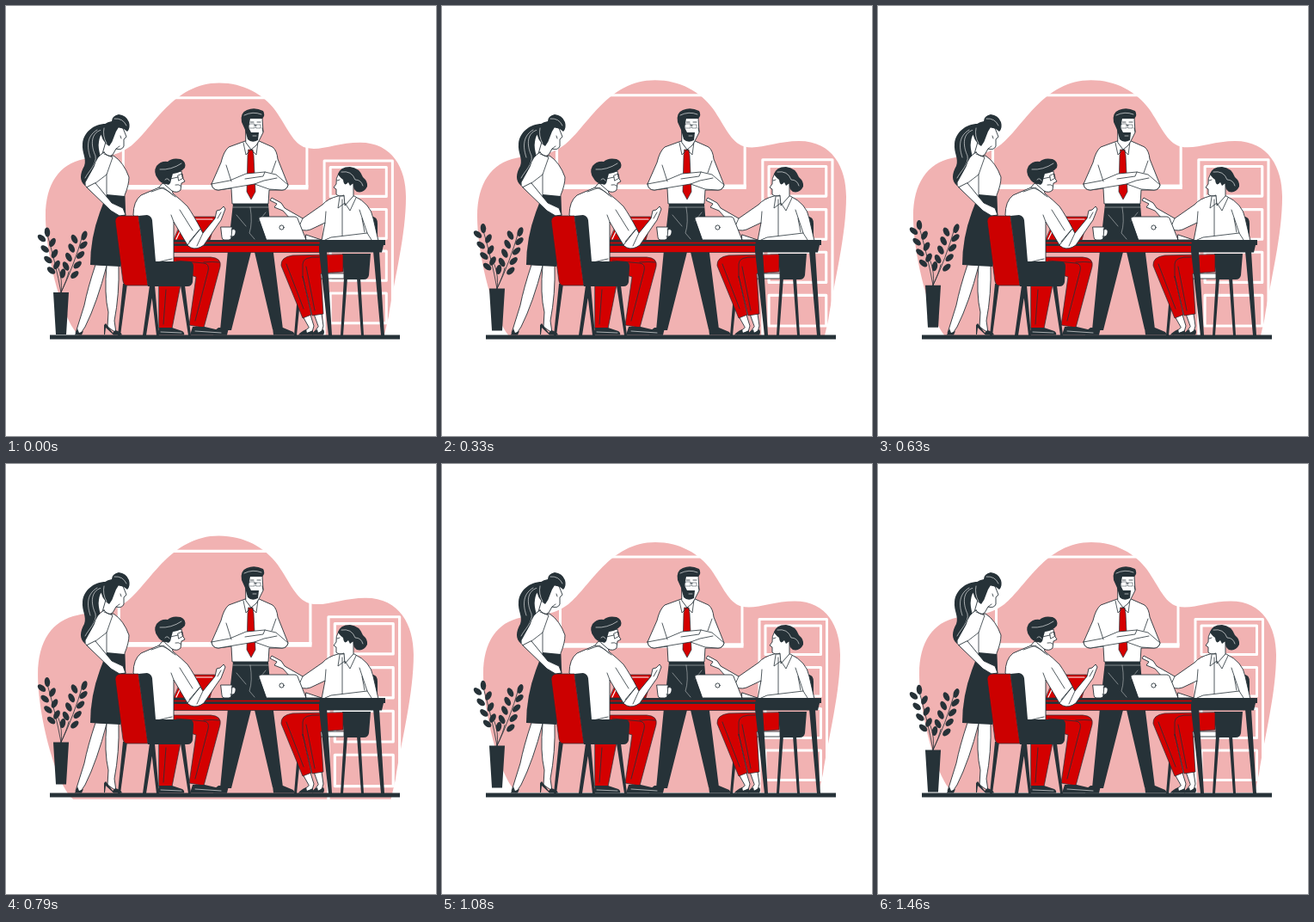
These frames come from a looping animation (500 by 500 pixels, 1500 ms). An HTML page:

```html
<!DOCTYPE html>
<html lang="en">
<head>
<meta charset="utf-8">
<title>Team meeting</title>
<style>
  html, body { margin: 0; height: 100%; overflow: hidden; background: #fff; }
  svg { display: block; width: 100vw; height: 100vh; }
  .pink { fill: #f1b2b2; }
  .dark { fill: #263238; }
  .red { fill: #d40000; stroke: #263238; stroke-width: .7; }
  .white { fill: #fff; stroke: #263238; stroke-width: .9; }
  .line { fill: none; stroke: #263238; stroke-width: .8; }
  .light { fill: none; stroke: #fff; stroke-width: .6; }
  .frame { fill: none; stroke: #fff; stroke-width: 3; }
  g { stroke-linejoin: round; stroke-linecap: round; }
</style>
</head>
<body>
<svg viewBox="0 0 500 500">
  <g id="backdrop">
    <path class="pink" d="M248 91C276 91 299 104 313 123C327 143 333 161 348 165.500C364 170 384 159.500 410 159.500C448 159.500 463 190 463 222C463 266 450 315 443 360L438 382H87C68 366 48 290 48 244C48 207 64 184 92 178.500C114 174 127 178 147 163C172 143 195 91 248 91Z"/>
    <path class="frame" d="M137.500 213V108H349V211"/>
    <path class="frame" stroke-linecap="butt" style="stroke-width:5.500" d="M136 211H350.500"/>
    <path class="frame" d="M369 382V180.500H447.500V382M376 188H440.500V221.500H376ZM376 236.500H440.500V270H376ZM376 284.500H440.500V318.500H376ZM376 333H440.500V367.500H376Z"/>
  </g>

  <g id="plant" class="dark">
    <path d="M55 333H73L70 382H58Z"/>
    <path class="line" d="M64 333Q58 300 47 262M64 333Q79 302 89 267M64 333Q66 318 61 305M64 333Q71 318 73 309"/>
  </g>

  <path class="dark" d="M51 382.500H458V387.500H51Z"/>

  <g id="standing-woman">
    <path class="dark" d="M116 137C102 137 90 147 89 160C88 171 94 177 91 186C86 195 85 203 92 209C93 201 104 198 109 187C113 177 106 168 108 158Q109 149 114 147Z"/>
    <path class="light" d="M111 144C96 148 100 166 104 174C106 184 96 192 92 200M106 144C92 152 95 167 98 176"/>
    <path class="white" d="M104 301Q95 328 91 348L81 380L86 382L92 373Q106 345 117 302Z"/>
    <path class="white" d="M117 302Q114 335 119 356L118 373L128 380L126 366Q132 335 131 302Z"/>
    <path class="dark" d="M83 375L80 382.500H88L90 378L85 380ZM116 369L114 371V382H115L116 374L125 382.500H135Q134 379 127 377L124 380Z"/>
    <path class="white" d="M122 139L136 142L140 152L137 155L137 163Q135 168 128 166L124 173Q116 178 112 172L116 158Z"/>
    <path class="dark" d="M110 143Q113 136 123 134Q123 128 131 126Q140 127 143 135Q145 142 141 146Q137 142 131 141Q128 145 126 151Q124 158 120 163Q110 157 110 143Z"/>
    <path class="white" d="M114 170Q105 175 102 187L92 205Q91 209 95 212L121 235Q128 245 138 244L138 220Q143 208 143 199Q137 182 125 174Q118 176 114 170Z"/>
    <path class="dark" d="M117 219L138 221L141 270L133 303L98 301Q98 270 109 240Z"/>
    <path class="white" d="M104 206L123 229L136 235L139 243L132 244L122 238L94 211Z"/>
    <path class="line" d="M114 172L124 176L117 196L104 206M117 196L117 219M133 151L134 154M128 166L132 163"/>
    <path class="light" d="M114 142Q112 151 117 160M126 131Q136 130 140 139"/>
  </g>

  <g id="standing-man">
    <path class="dark" d="M264 230H305L307 255L322 376H310L289 286H285L262 377H249L258 284Z"/>
    <path class="dark" d="M247 374H259L257 382.500H241Q241 378 247 374ZM310 374H322L334 379L336 382.500H311Z"/>
    <path class="light" style="opacity:.7" d="M264 234H305M284 234Q287 252 283 264L289 271M268 243L279 256M302 240L294 250"/>
    <path class="white" d="M281 156L259 164Q253 169 250 182L239 207Q240 214 247 214L262 212L263 230H305L306 214L321 214Q327 214 328 208L316 178Q315 168 310 164L292 156Z"/>
    <path class="red" d="M282 167H287L288 174L290 216L285 225L280 216L281 174Z"/>
    <path class="white" d="M239 207L260 203L279 195L301 193L314 196L328 208Q326 214 321 214L306 213L289 207L247 214Q240 214 239 207Z" style="stroke-width:.8"/>
    <path class="line" d="M289 207L300 203L315 200M301 193L299 198L278 201M256 185L262 204M314 180L309 194M276 159L279 173L285 167L291 173L293 158"/>
    <path class="white" d="M279 130H298L299 147L294 157L291 162L285 167L279 159Z"/>
    <path class="dark" d="M274 135Q272 124 280 121Q289 117 299 122Q302 127 298 131L284 131L282 141L285 147L294 147L293 156Q286 160 281 155L278 144Z"/>
    <path class="white" style="stroke-width:.5" d="M283 137H289V142H283ZM291 138H296V142H291Z"/>
    <path class="line" d="M278 138L283 137.500M289 138.500H291M284 135H288M292 135H296M298 142L299 146"/>
    <path class="light" d="M277 127Q287 122 297 126M287 151H291"/>
  </g>

  <g id="seated-woman">
    <path class="dark" d="M419 246L427 245Q432 246 432 253V275H418Z"/>
    <path class="dark" d="M391 288H424L422 313Q421 318 416 318H393ZM393 316H397L392 383H389ZM408 316H412L416 383H413ZM341 312H345L338 383H335Z"/>
    <path class="white" d="M341 311H393V317H341Z"/>
    <path class="white" d="M345 360L354 359L358 372L356 379L343 382L352 374ZM358 357L367 358L369 372L367 379L356 382L363 373Z"/>
    <path class="red" d="M392 289V309L366 311L369 358L356 360L345 314L355 359L345 363L320 302Q319 292 333 290Z"/>
    <path class="line" d="M364 292Q345 291 345 300V316M326 300L346 352M349 303L359 354"/>
    <path class="dark" d="M340 382.500Q342 379 349 376L350 380L357 377V382.500ZM354 382.500Q357 379 362 376L363 380L369 376Q371 379 369 382.500Z"/>
    <path class="white" d="M386 221Q374 224 368 231L345 247L324 235L320 229L309 223L307 226L315 230L312 234L322 238L339 257Q345 263 354 260L371 252L367 273H433L427 247Q424 230 405 221Z"/>
    <path class="line" d="M372 239L371 252M420 264L378 269L371 272M411 237L420 264L425 272M391 225V267M345 247L340 258M414 247L417 263"/>
    <path class="white" d="M387 194Q383 201 384 207L381 211L384 213L384 219Q387 222 393 220L394 232L404 221L404 207Z"/>
    <path class="line" d="M388 222L386 235L394 229L400 238L407 223M385 203L388 202"/>
    <path class="dark" d="M386 196Q388 187 400 187Q411 188 415 199Q421 204 420 210Q416 218 408 216Q403 213 404 206L400 209L398 205Q393 211 392 202Q389 200 386 196Z"/>
    <path class="light" d="M390 193Q402 191 406 202Q413 202 415 209"/>
  </g>

  <g id="table">
    <path class="red" d="M195 277H366V286.500H195Z"/>
    <path class="dark" d="M195 272H441V278H439L437 286.500H364V279H195ZM364 285H373L379 383H375ZM427 285H434L440 383H436Z"/>
    <path d="M195 275.500H364" stroke="#d40000" stroke-width="1.600"/>
    <path class="white" d="M294 247Q294 245 297 245H336Q338 245 339 247L349 272H303ZM349 266L367 272H349Z"/>
    <circle class="white" cx="320.500" cy="257.500" r="2.600"/>
    <path class="white" d="M262 260Q268 258 267 264Q266 269 261 268M250 257H263L262 269Q262 272 259 272H254Q251 272 251 269Z"/>
    <path class="red" d="M207 245H242Q245 245 244 248L237 272H195Z"/>
    <path class="light" style="stroke-width:1.200" d="M240 248H209L198 271"/>
  </g>

  <g id="seated-man">
    <path class="dark" d="M136 323H141L133 383H130Z"/>
    <path class="red" d="M178 324H203L193 375H178Z"/>
    <path class="red" d="M190 292H238Q251 293 249 303L230 374L213 371L221 315L205 310L188 303Z"/>
    <path class="line" d="M198 296L230 299Q237 300 235 308L220 366M186 330L183 370M248 298Q240 297 230 298"/>
    <path class="dark" d="M178 374H193L205 378Q208 380 207 382.500H176ZM217 373H231L248 377Q257 379 257 382.500H214Z"/>
    <path class="light" d="M180 379L204 380M220 378L250 380"/>
    <path class="white" d="M181 207L178 211L157 220Q148 227 148 243L162 262L167 302L195 299V251L211 278L228 262Q218 243 211 233Q204 226 194 218L192 207Z"/>
    <path class="line" d="M195 251L192 243M169 216L183 211L197 222M178 211Q188 213 194 220M164 246L169 259M202 237L217 261M176 298L193 294"/>
    <path class="white" d="M211 278L226 259L229 264L243 247L245 238L249 237L253 233L255 236L250 249L245 256L230 278Q222 284 215 281Z"/>
    <path class="line" d="M222 279L229 264M246 247L250 240M213 274L225 260"/>
    <path class="white" d="M190 195L204 192L205 199L208 204L204 206L203 214Q199 218 193 215L185 208Z"/>
    <path class="dark" d="M176 200Q171 193 175 186Q180 180 188 181Q193 176 203 178Q210 181 208 188Q203 194 194 195L192 202Q191 210 186 207Q179 206 176 200Z"/>
    <path class="line" d="M191 201L200 199M200 197L205 195L206 200L201 203ZM197 208Q201 207 203 209"/>
    <path class="light" d="M179 190Q192 191 204 183M185 202Q188 199 190 203"/>
    <path class="red" style="fill:#cc0000" d="M127 250Q127 245 133 244H154L165 325H141Q137 325 136 320Z"/>
    <path class="dark" d="M154 244L164 243Q169 244 170 249L174 297H214Q218 298 218 303L217 321Q216 326 211 326H165ZM167 325H172L163 383H159ZM168 325H173L178 383H175ZM203 325H208L215 383H212Z"/>
  </g>
</svg>
<script>
const LOOP = 1500, STEPS = 36, LEAD = 16, PEAK = 1.088;
const beat = [[0, 1], [144, PEAK], [477, 1], [586, 1], [729, PEAK], [925, 1], [LOOP, 1]];
const backdrop = document.getElementById('backdrop');
const plant = document.getElementById('plant');

function leaf(x, y, angle) {
  const el = document.createElementNS('http://www.w3.org/2000/svg', 'ellipse');
  el.setAttribute('rx', 3.2);
  el.setAttribute('ry', 5.6);
  el.setAttribute('transform', `translate(${x} ${y}) rotate(${angle})`);
  plant.append(el);
}

// Leaves sit in pairs along two leaning branches, then around the pot.
leaf(48, 263, -5);
leaf(91, 267, 20);
for (let i = 0; i < 4; i++) {
  leaf(41.5 + 3.7 * i, 270 + 12.5 * i, -50);
  leaf(79.5 - 3.3 * i, 271 + 10.5 * i, -28);
  leaf(90 - 3.4 * i, 278 + 11.5 * i, 48);
  if (i < 3) leaf(54 + 2.5 * i, 275 + 13 * i, 28);
}
leaf(66, 311, 10);

function valueAt(keys, t) {
  const i = keys.findIndex(([time]) => time > t);
  const [t0, v0] = keys[i - 1], [t1, v1] = keys[i];
  return v0 + (v1 - v0) * (t - t0) / (t1 - t0);
}

function draw() {
  const step = Math.floor(performance.now() / LOOP * STEPS + .13) % STEPS;
  const t = step * LOOP / STEPS;
  const scale = valueAt(beat, (t + LEAD) % LOOP);
  const lift = 10 * (1 - Math.abs(1 - 2 * t / LOOP));
  backdrop.setAttribute('transform', `translate(255.5 233) scale(${scale}) translate(-255.5 -233)`);
  plant.setAttribute('transform', `translate(0 ${-lift})`);
  requestAnimationFrame(draw);
}
draw();
</script>
</body>
</html>
```
